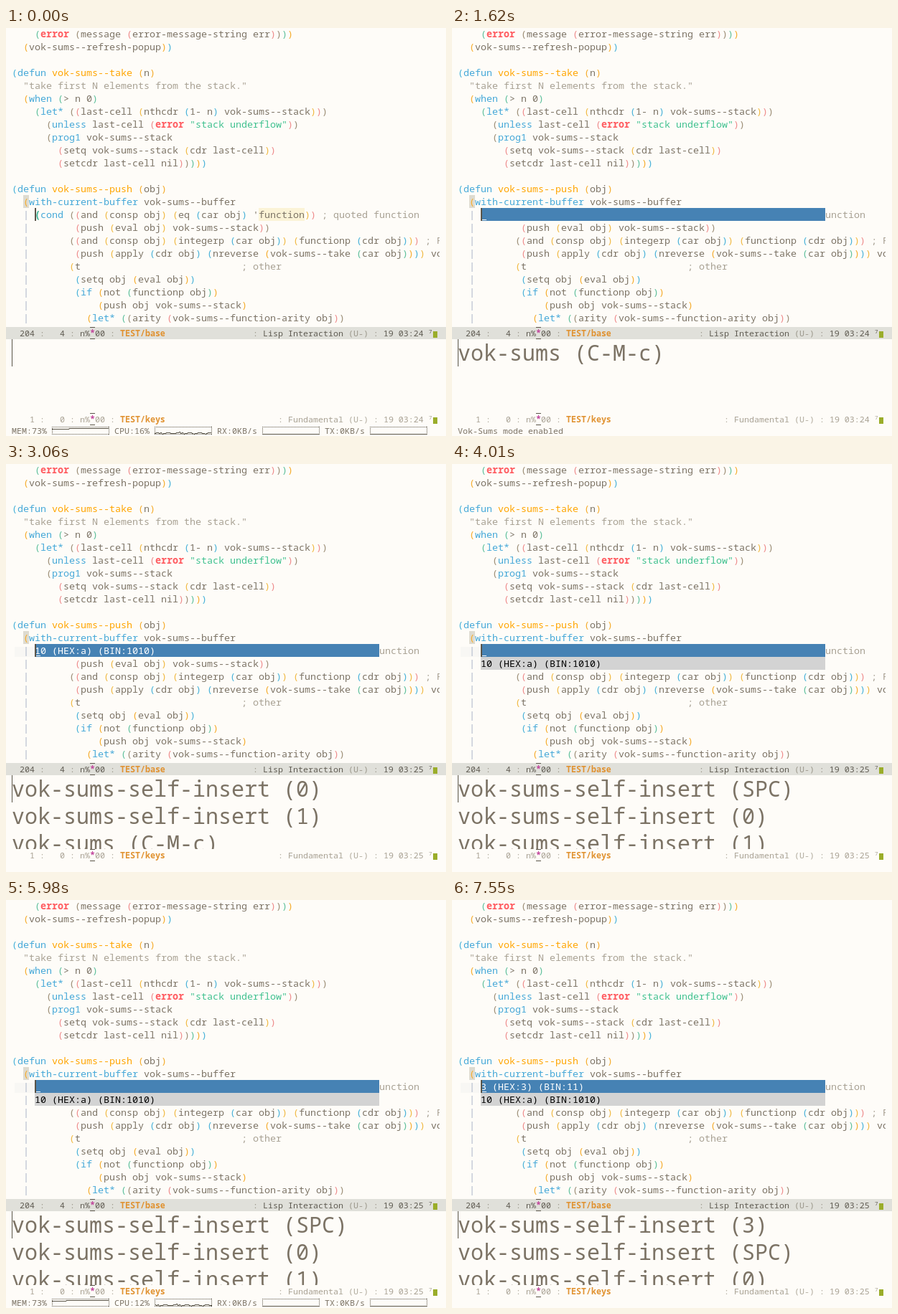
An HTML page that plays this animation: 613x569 px, repeating every 8000 ms.

```html
<!DOCTYPE html>
<html lang="en">
<head>
<meta charset="utf-8">
<title>Stack calculator in an editor</title>
<style>
  html, body { margin: 0; width: 100%; height: 100%; overflow: hidden; background: #fefcf8; }
  svg { display: block; width: 613px; height: 569px; }
  text { font-family: "Noto Sans Mono", "DejaVu Sans Mono", monospace; white-space: pre; }
</style>
</head>
<body>
<svg id="stage" viewBox="0 0 613 569">
  <clipPath id="page"><rect width="604" height="417"/></clipPath>
  <g id="code" clip-path="url(#page)"></g>
  <g id="live"></g>
</svg>
<script>
const C = {
  bg: '#fefcf8', fg: '#7c7365', blue: '#45a8d8', name: '#ffa500', red: '#ff5a5f',
  string: '#3fc18f', dim: '#a8a193', guide: '#a9b4c8', ink: '#5a5549', line: '#f8f7f4',
  bar: '#e0e0da', tag: '#e0912f', mark: '#c0409a', popup: '#4682b4', list: '#d3d3d3', level: '#9aad2a'
};
const DEPTH = ['#45b0d8', '#f5ab2a', '#5cbf9a', '#9b8c74', '#ee8a8a', '#f0b840'];
const KEYWORDS = /^(defun|when|let\*|unless|prog1|with-current-buffer|cond|if)$/;

const CODE = [
  '    (error (message (error-message-string err))))',
  '  (vok-sums--refresh-popup))',
  '',
  '(defun vok-sums--take (n)',
  '  "take first N elements from the stack."',
  '  (when (> n 0)',
  '    (let* ((last-cell (nthcdr (1- n) vok-sums--stack)))',
  '      (unless last-cell (error "stack underflow"))',
  '      (prog1 vok-sums--stack',
  '        (setq vok-sums--stack (cdr last-cell))',
  '        (setcdr last-cell nil)))))',
  '',
  '(defun vok-sums--push (obj)',
  '  (with-current-buffer vok-sums--buffer',
  "  | (cond ((and (consp obj) (eq (car obj) 'function)) ; quoted function",
  '  |        (push (eval obj) vok-sums--stack))',
  '  |       ((and (consp obj) (integerp (car obj)) (functionp (cdr obj))) ; F',
  '  |        (push (apply (cdr obj) (nreverse (vok-sums--take (car obj)))) vok',
  '  |       (t                            ; other',
  '  |        (setq obj (eval obj))',
  '  |        (if (not (functionp obj))',
  '  |            (push obj vok-sums--stack)',
  '  |          (let* ((arity (vok-sums--function-arity obj))'
];

const KEY = k => `vok-sums-self-insert (${k})`;
const START = 'vok-sums (C-M-c)';
const TEN = '10 (HEX:a) (BIN:1010)';
const STEPS = [
  { at: 0, clock: '03:24', keys: [], cpu: 16 },
  { at: 500, clock: '03:24', keys: [START], popup: [''], echo: 'Vok-Sums mode enabled' },
  { at: 2360, clock: '03:25', keys: [KEY(1), START], popup: ['1 (HEX:1) (BIN:1)'] },
  { at: 3060, clock: '03:25', keys: [KEY(0), KEY(1), START], popup: [TEN], lit: true },
  { at: 4010, clock: '03:25', keys: [KEY('SPC'), KEY(0), KEY(1)], popup: ['', TEN], lit: true },
  { at: 5980, clock: '03:25', keys: [KEY('SPC'), KEY(0), KEY(1)], popup: ['', TEN], lit: true, cpu: 12 },
  { at: 6880, clock: '03:25', keys: [KEY(3), KEY('SPC'), KEY(0)], popup: ['3 (HEX:3) (BIN:11)', TEN], lit: true }
];
const LOOP = 8000;

const code = document.getElementById('code');
const live = document.getElementById('live');

function add(parent, tag, attrs, content) {
  const el = document.createElementNS('http://www.w3.org/2000/svg', tag);
  for (const k in attrs) el.setAttribute(k, attrs[k]);
  if (content !== undefined) el.textContent = content;
  parent.appendChild(el);
  return el;
}
const rect = (g, x, y, width, height, fill) => add(g, 'rect', { x, y, width, height, fill });

// Font size follows from the wanted column width, whichever monospace font is present.
const pen = document.createElement('canvas').getContext('2d');
pen.font = '100px "Noto Sans Mono", "DejaVu Sans Mono", monospace';
const advance = pen.measureText('0').width / 100;

function write(g, x, y, col, spans) {
  const line = add(g, 'text', { x, y, 'font-size': col / advance });
  for (const [str, fill, bold] of spans)
    add(line, 'tspan', { fill, 'font-weight': bold ? 700 : 400 }, str);
}

const rowTop = i => 18 * i - 1;
const glow = rect(code, 12, rowTop(14) + 4, 28, 14, C.line);

function drawCode() {
  let depth = 2;
  CODE.forEach((src, row) => {
    let prev = '';
    const spans = (src.match(/"[^"]*"|;.*|[()]|\s+|[^\s()";]+/g) || []).map(t => {
      let fill = C.fg, bold = false;
      if (t === '(') fill = DEPTH[depth++ % DEPTH.length];
      else if (t === ')') fill = DEPTH[--depth % DEPTH.length];
      else if (t[0] === ';') fill = C.dim;
      else if (t[0] === '"') fill = row === 4 ? C.dim : C.string;
      else if (t === '|') fill = C.guide;
      else if (t === 'error') { fill = C.red; bold = true; }
      else if (KEYWORDS.test(t)) fill = C.blue;
      else if (prev === 'defun') fill = C.name;
      if (t.trim()) prev = t;
      return [t, fill, bold];
    });
    if (row === 13) rect(code, 24, rowTop(row), 8, 18, '#dedbd0');
    if (row === 14) rect(code, 352, rowTop(row), 64, 18, '#fbf3d6');
    write(code, 8, rowTop(row) + 14, 8, spans);
  });
}

function drawPopup(rows) {
  rows.forEach((str, i) => {
    const y = rowTop(14 + i);
    rect(live, 40, y, 480, 18, i ? C.list : C.popup);
    write(live, 40, y + 14, 8, [[str, i ? '#000' : '#fff']]);
    if (!i) rect(live, 41, y + 16, 7, 1, '#fff');
  });
}

function drawModeline(top, active, place, name, mode, clock) {
  const main = active ? '#5f5b52' : C.dim;
  const soft = active ? '#9a968a' : '#b0aa9c';
  rect(live, 0, top, 613, 17, active ? C.bar : C.bg);
  const y = top + 13;
  write(live, 19, y, 7, [
    [place[0], main], [' : ', soft], [place[1], main], [' : ', soft],
    ['n%', main], ['*', C.mark, true], ['00', main], [' : ', soft], [name, C.tag, true]
  ]);
  rect(live, 117, top, 7, 1, C.ink);
  rect(live, 117, top + 16, 7, 1, C.ink);
  write(live, 470 - 7 * (mode.length + 2), y, 7, [
    [': ', soft], [mode, main], [' (U-) : ', soft], ['19 ' + clock, main]
  ]);
  write(live, 589, top + 9, 4.5, [['7', main]]);
  rect(live, 595, top + 6, 6, 9, C.level);
}

function drawGraph(x, height) {
  const dotted = d => add(live, 'path', { d, stroke: C.ink, 'stroke-dasharray': '1 1' });
  for (const y of [556.5, 566.5]) dotted(`M${x} ${y}h80`);
  for (const side of [x + 0.5, x + 79.5]) dotted(`M${side} 556v11`);
  let d = '';
  for (let i = 0; i < 80; i += 2) d += `${i ? 'L' : 'M'}${x + i} ${566.5 - Math.round(height(i))}h2`;
  add(live, 'path', { d, fill: 'none', stroke: C.ink });
}

function drawMeters(cpu) {
  const shift = 16 - cpu;
  const noise = i => 1.4 + 0.8 * Math.sin((i + shift) * 0.43) + 0.6 * Math.sin((i + shift) * 1.7);
  const meters = [
    [8, 'MEM:73%', i => i + shift < 24 ? 7 : 8],
    [151, `CPU:${cpu}%`, noise],
    [294, 'RX:0KB/s', () => 0],
    [444, 'TX:0KB/s', () => 0]
  ];
  for (const [x, label, height] of meters) {
    write(live, x, 566, 7, [[label, C.fg]]);
    drawGraph(x + 7 * (label.length + 1), height);
  }
}

function draw(step) {
  live.textContent = '';
  glow.setAttribute('opacity', step.lit ? 1 : 0);
  if (step.popup) drawPopup(step.popup);
  else write(live, 40, 265, 8, [['(', '#3fb59a', true]]);
  rect(live, 40, 251, 2, 18, C.ink);
  step.keys.forEach((str, i) => write(live, 8, 464 + 38 * i, 18, [[str, C.fg]]));
  rect(live, 0, 537, 613, 32, C.bg);
  rect(live, 8, 434, 1, 38, C.ink);
  drawModeline(417, true, ['204', '  4'], 'TEST/base', 'Lisp Interaction', step.clock);
  drawModeline(537, false, ['  1', '  0'], 'TEST/keys', 'Fundamental', step.clock);
  if (step.cpu) drawMeters(step.cpu);
  if (step.echo) write(live, 8, 566, 7, [[step.echo, C.fg]]);
}

let shown = null;
const begin = performance.now();
function tick() {
  const t = (performance.now() - begin) % LOOP;
  const step = STEPS.filter(s => s.at <= t).pop();
  if (step !== shown) draw(shown = step);
  requestAnimationFrame(tick);
}
drawCode();
tick();
</script>
</body>
</html>
```
